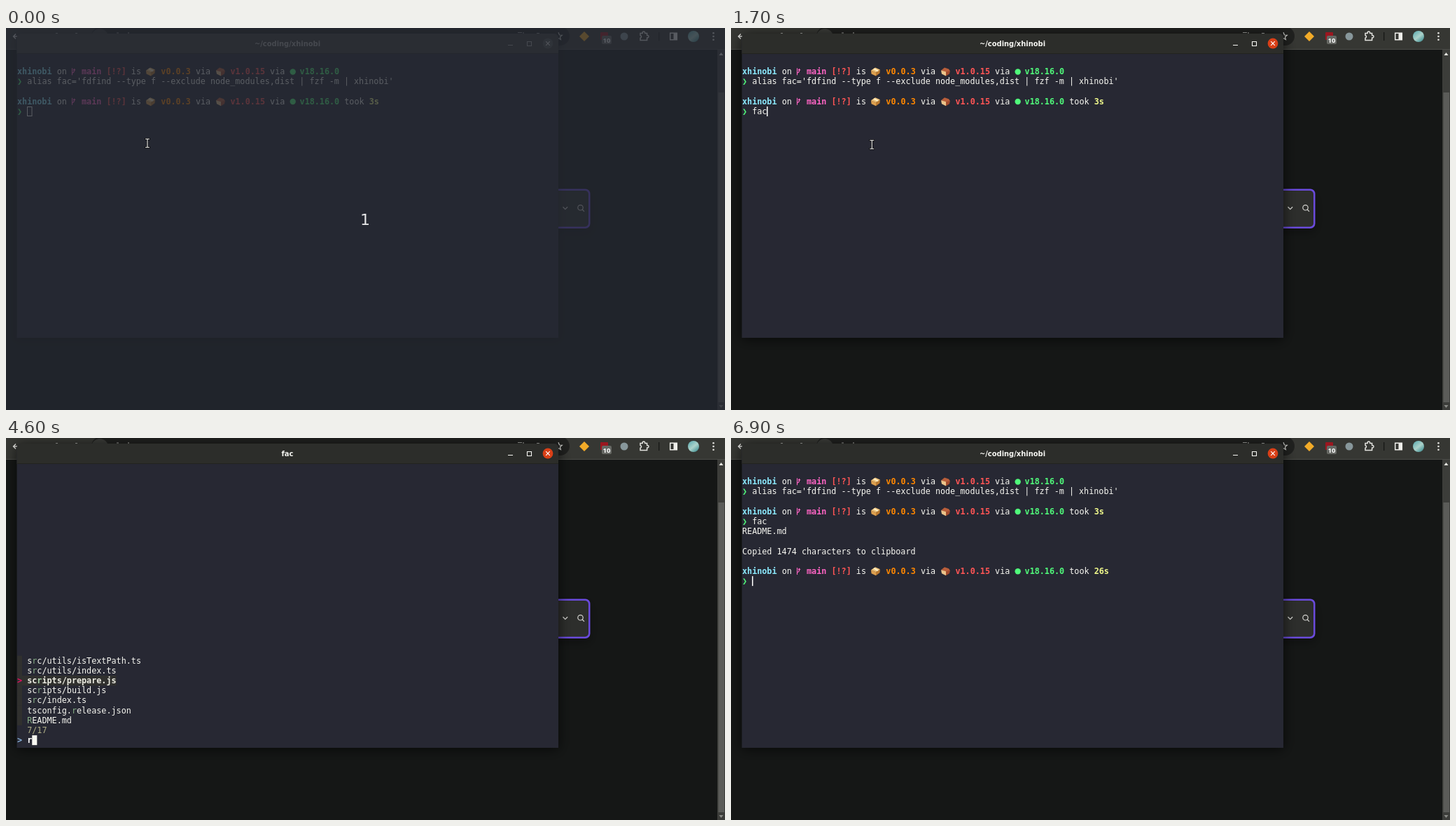
An HTML page with a canvas for the animation above (8000 ms loop, 1027 px wide and 545 px high).

```html
<!DOCTYPE html>
<html lang="en">
<head>
<meta charset="utf-8">
<title>Terminal session</title>
<style>
html, body { margin: 0; width: 100%; height: 100%; overflow: hidden; background: #151716; }
canvas { display: block; }
</style>
</head>
<body>
<canvas id="stage" width="1027" height="545"></canvas>
<script>
const ctx = document.getElementById('stage').getContext('2d');
const LOOP = 8000;
const CELL = 7.08, LINE = 14.19, LEFT = 16, TOP = 55.2;
const MONO = '11.76px "DejaVu Sans Mono", monospace';
const WHITE = '#f8f8f2', GREEN = '#50fa7b', PINK = '#ff65c5', RED = '#ff5555';
const DARK_ROW = '#30302e';

const FILES = [
  'README.md', 'package.json', 'bun.lockb', 'scripts/build.js', 'tsconfig.json',
  'scripts/prepare.js', 'src/index.ts', 'src/utils/index.ts', 'src/utils/isTextPath.ts',
  'tsconfig.release.json', 'LICENSE', 'dist/index.js', 'dist/index.d.ts',
  'dist/utils/index.js', 'commitlint.config.js', 'jest.config.ts', 'changelog.md'
];
const BY_SCORE = [0, 9, 6, 3, 5, 7, 8].map(i => FILES[i]);

// Value of the last [time, value] step that has begun.
function at(steps, t) {
  let value = steps[0][1];
  for (const [start, v] of steps) if (t >= start) value = v;
  return value;
}

const colX = col => LEFT + col * CELL;
const rowY = row => TOP + row * LINE;

function rect(x, y, w, h, color) {
  ctx.fillStyle = color;
  ctx.fillRect(x, y, w, h);
}

function round(x, y, w, h, r, color) {
  ctx.beginPath();
  ctx.roundRect(x, y, w, h, r);
  ctx.fillStyle = color;
  ctx.fill();
}

function disc(x, y, r, color) {
  ctx.beginPath();
  ctx.arc(x, y, r, 0, Math.PI * 2);
  ctx.fillStyle = color;
  ctx.fill();
}

function poly(points, color) {
  ctx.beginPath();
  points.forEach(([x, y]) => ctx.lineTo(x, y));
  ctx.closePath();
  ctx.fillStyle = color;
  ctx.fill();
}

function stroke(path, color, width = 1) {
  ctx.strokeStyle = color;
  ctx.lineWidth = width;
  ctx.stroke(new Path2D(path));
}

function label(text, x, y, font, color, align = 'center') {
  ctx.font = font;
  ctx.textAlign = align;
  ctx.fillStyle = color;
  ctx.fillText(text, x, y);
}

function put(text, col, row, color = WHITE, bold = false) {
  label(text, colX(col), rowY(row) + 11.1, (bold ? 'bold ' : '') + MONO, color, 'left');
}

function drawToolbar() {
  rect(0, 0, 1027, 30, '#363733');
  rect(0, 30, 1027, 1, '#4b4c48');
  round(122, -2, 683, 27, 13.5, '#20211f');
  disc(134, 13, 12, '#3a3b38');
  stroke('M17 12H10.5M14 8.5L10.5 12L14 15.5', '#e4e4e0', 1.4);
  stroke('M71 7.5H74M99 7.5H102M158 7H161M175 6V8M731 6.5H737M739 6V8M758 7.5H762', '#a5a6a2', 1.2);
  stroke('M789 6.3L790.5 10L794.3 10.2L791.4 12.7L792.4 16.5L789 14.4', '#d0d0cc', 1.2);

  poly([[826, 5], [833, 12], [826, 19], [819, 12]], '#f2ab28');
  round(849, 6, 11, 11, 1, '#9b1720');
  round(851, 11, 14, 12, 2, '#666864');
  label('10', 858, 20.8, 'bold 9.5px "Open Sans", sans-serif', '#ffffff');
  disc(883, 12, 5.5, '#87979b');
  stroke('M906 7.5H909.2V6.6A1.7 1.7 0 0 1 912.6 6.6V7.5H915.6V10.6H916.3A1.7 1.7 0 0 1 916.3 14H915.6V17.4H906V14.3A2 2 0 0 0 906 10.4Z', '#e4e4e0', 1.5);
  rect(932, 6, 1.3, 12, '#171816');
  stroke('M948.7 7.2H958.3V16.8H948.7Z', '#eeeeea', 1.5);
  rect(953.5, 7, 5, 10, '#eeeeea');

  const avatar = ctx.createLinearGradient(976, 5, 988, 20);
  avatar.addColorStop(0, '#62aeb2');
  avatar.addColorStop(.5, '#acd2ca');
  avatar.addColorStop(1, '#398d92');
  disc(982, 12, 8, avatar);
  for (const y of [7.3, 12, 16.7]) disc(1010.5, y, 1.3, '#e4e4e0');
}

function drawPage() {
  rect(0, 0, 1027, 545, '#151716');
  drawToolbar();
  rect(1016, 31, 11, 514, '#3c3d3a');
  rect(1017.5, 92, 8.5, 442, '#5b5c59');
  poly([[1018.5, 39], [1021.5, 35], [1024.5, 39]], '#e6e6e2');
  poly([[1018.5, 538], [1021.5, 542], [1024.5, 538]], '#8a8b87');

  ctx.save();
  ctx.shadowColor = 'rgba(0,0,0,.3)';
  ctx.shadowBlur = 14;
  ctx.shadowOffsetY = 6;
  round(700, 229.5, 134.5, 56.5, 7, '#6a4bdc');
  ctx.restore();
  round(700, 232, 132, 51.5, 5, '#2d2e2c');
  stroke('M795.5 255.3L798.8 258.6L802.1 255.3', '#d4d4d0', 1.3);
  stroke('M824.2 256.3A3.7 3.7 0 1 1 816.8 256.3A3.7 3.7 0 1 1 824.2 256.3M823.2 259L826 261.8', '#d4d4d0', 1.2);
}

function drawWindow(focused, title) {
  ctx.save();
  ctx.shadowColor = focused ? 'rgba(0,0,0,.65)' : 'rgba(0,0,0,.45)';
  ctx.shadowBlur = focused ? 18 : 11;
  ctx.shadowOffsetY = 2;
  round(15.5, 8, 773.5, 434, [6, 6, 0, 0], '#272833');
  ctx.restore();
  round(15.5, 8, 773.5, 29, [6, 6, 0, 0], focused ? '#2c2d2a' : '#3b3b38');
  rect(15.5, 36, 773.5, 1, '#22231f');

  const ink = focused ? '#f6f6f2' : '#a9a9a5';
  label(title, 402, 26.4, 'bold 9.93px "DejaVu Sans", sans-serif', ink);
  stroke('M717 24.5H724M744.5 19.5H750.5V25.5H744.5Z', ink, 1.1);
  disc(774, 22, 7.4, focused ? '#d93f17' : '#51524e');
  stroke('M771.2 19.2L776.8 24.8M776.8 19.2L771.2 24.8', focused ? '#ffffff' : '#d0d0cc', 1.2);
}

function drawPackage(x, y) {
  poly([[x, y + 4], [x + 6, y], [x + 13, y + 3], [x + 7, y + 7]], '#f0c47c');
  poly([[x, y + 4], [x + 7, y + 7], [x + 7, y + 12], [x + .5, y + 9]], '#dda04f');
  poly([[x + 7, y + 7], [x + 13, y + 3], [x + 12.5, y + 8], [x + 7, y + 12]], '#bd7b31');
  poly([[x + 3, y + 2], [x + 5, y + 1], [x + 11, y + 4.3], [x + 9, y + 5.7]], '#fff0c8');
}

function drawBread(x, y) {
  poly([[x, y + 4], [x + 5, y], [x + 11, y + 2], [x + 13, y + 5], [x + 7, y + 7]], '#b85e3b');
  poly([[x, y + 4], [x + 7, y + 6], [x + 7, y + 12], [x + 1, y + 9]], '#ecc48a');
  poly([[x + 7, y + 6], [x + 13, y + 4.5], [x + 12, y + 9], [x + 7, y + 12]], '#a34b2d');
}

function drawPrompt(row, took) {
  const y = rowY(row);
  put('xhinobi', 0, row, '#8be9fd', true);
  put('on', 8, row);
  stroke(`M94.5 ${y + 2}V${y + 12}M94.5 ${y + 9}Q98 ${y + 8} 97.5 ${y + 4}M96 ${y + 5.2}L97.5 ${y + 3.5}L99 ${y + 5.2}`, PINK, 1.1);
  put('main', 13, row, PINK, true);
  put('[!?]', 18, row, RED, true);
  put('is', 23, row);
  drawPackage(200, y + 1.4);
  put('v0.0.3', 29, row, '#ff8700', true);
  put('via', 36, row);
  drawBread(300, y + 1.4);
  put('v1.0.15', 43, row, RED, true);
  put('via', 51, row);
  disc(409.7, y + 7.3, 4.2, GREEN);
  put('v18.16.0', 57, row, GREEN, true);
  if (took) {
    put('took', 66, row);
    put(took, 71, row, '#f1fa8c', true);
  }
  put('❯', 0, row + 1, GREEN, true);
}

function bar(col, row) {
  rect(Math.round(colX(col)), rowY(row), 1.5, 14, '#ffffff');
}

function block(col, row) {
  rect(colX(col), rowY(row), CELL, 14, WHITE);
}

function drawShell(t) {
  const typed = at([[0, ''], [1500, 'f'], [1700, 'fac']], t);
  drawPrompt(0);
  put("alias fac='fdfind --type f --exclude node_modules,dist | fzf -m | xhinobi'", 2, 1);
  drawPrompt(3, '3s');
  put(typed, 2, 4);
  if (t >= 6900) {
    put('README.md', 0, 5);
    put('Copied 1474 characters to clipboard', 0, 7);
    drawPrompt(9, '26s');
    bar(2, 10);
  } else if (t >= 3100) {
    block(0, 5);
  } else if (t < 300) {
    ctx.strokeStyle = WHITE;
    ctx.lineWidth = 1;
    ctx.strokeRect(30.5, 112.5, 6.5, 13);
  } else if (at([[0, true], [1300, false], [1500, true], [2300, false], [2800, true]], t)) {
    bar(2 + typed.length, 4);
  }
}

// Positions of the matched letters, or null when the query does not fit.
function match(name, query) {
  const text = name.toLowerCase();
  const whole = text.indexOf(query);
  if (whole >= 0) return [...query].map((_, i) => whole + i);
  const hits = [];
  let from = 0;
  for (const ch of query) {
    const i = text.indexOf(ch, from);
    if (i < 0) return null;
    hits.push(i);
    from = i + 1;
  }
  return hits;
}

function drawFinder(t) {
  const query = at([[0, ''], [4600, 'r'], [4700, 're'], [4800, 'read'], [5100, 'readm'], [5200, 'readme']], t);
  const index = at([[0, 0], [4000, 2], [4200, 3], [4300, 4]], t);
  const cursorOn = at([[0, true], [3700, false], [4000, true], [5700, false], [6000, true], [6600, false]], t);
  const marked = t >= 6000;
  const shown = (query ? BY_SCORE : FILES).filter(name => match(name, query));
  const current = Math.min(index, shown.length - 1);

  shown.forEach((name, i) => {
    const row = 24 - i, active = i === current;
    const hits = match(name, query);
    rect(LEFT, rowY(row), active ? (name.length + 2) * CELL : CELL, LINE, DARK_ROW);
    if (active) put('>', 0, row, '#e0105f', true);
    if (active && marked) put('>', 1, row, '#d75f87', true);
    [...name].forEach((ch, k) => {
      const color = hits.includes(k) ? (active ? '#afd7af' : '#87af87') : (active ? '#eeeee4' : WHITE);
      put(ch, 2 + k, row, color, active);
    });
  });
  put(`${shown.length}/17${marked ? ' (1)' : ''}`, 2, 25, '#afaf87');
  put('>', 0, 26, '#87afd7', true);
  put(query, 2, 26, '#ffffff', true);
  if (cursorOn) block(2 + query.length, 26);
}

function drawPointer(x, y) {
  const beam = `M${x - 2.5} ${y - 6}H${x + 2.5}M${x} ${y - 6}V${y + 6}M${x - 2.5} ${y + 6}H${x + 2.5}`;
  ctx.lineCap = 'square';
  stroke(beam, '#000000', 2.6);
  stroke(beam, '#ffffff', 1.1);
  ctx.lineCap = 'butt';
}

function draw(t) {
  const finder = t >= 3300 && t < 6900;
  const running = t >= 3100 && t < 6900;
  drawPage();
  drawWindow(t >= 300, running ? 'fac' : '~/coding/xhinobi');
  if (finder) drawFinder(t);
  else drawShell(t);

  if (t < 100) {
    rect(0, 0, 1027, 545, 'rgba(37,41,50,.75)');
    label('1', 513, 281, '22px "DejaVu Sans", sans-serif', '#e6e7e8');
  }
  if (t < 800) drawPointer(202, 164.3);
  else if (t < 3800) drawPointer(201.3, 166.3);
}

const begin = performance.now();
function frame() {
  draw((performance.now() - begin) % LOOP);
  requestAnimationFrame(frame);
}
frame();
</script>
</body>
</html>
```
